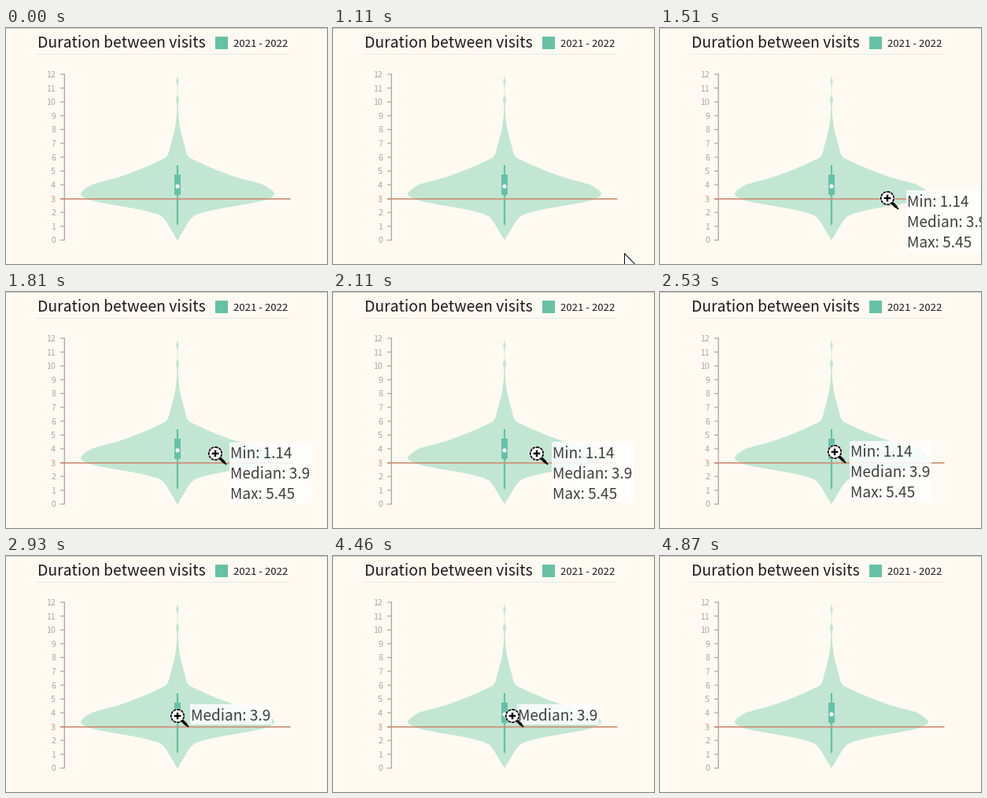
Recreate the animation shown at these times as a matplotlib script. Size 408x301 px, loop 5470 ms.

```python
import numpy as np
import matplotlib.pyplot as plt
from matplotlib.animation import FuncAnimation
from matplotlib.patches import Circle, Polygon, Rectangle

W, H, DPI = 408, 301, 64
LOOP, STEP = 5470, 10
PT = 72 / DPI  # points per pixel
CENTER = 218

CREAM, MINT, GREEN = "#fffaf1", "#c3e6d4", "#67c1a5"
GREY, RUST, INK, TIP_INK = "#a9a7a3", "#cd9178", "#1c1a1e", "#404040"
FONT = "Noto Sans CJK JP"

fig = plt.figure(figsize=(W / DPI, H / DPI), dpi=DPI, facecolor=CREAM)
ax = fig.add_axes([0, 0, 1, 1])
ax.set_xlim(0, W)
ax.set_ylim(H, 0)
ax.axis("off")


def line(xs, ys, color, width, z=1):
    return ax.plot(xs, ys, color=color, lw=width * PT, zorder=z,
                   solid_capstyle="butt", snap=False)[0]


def text(x, y, label, px, color, z=1, **kw):
    return ax.text(x, y, label, fontsize=px * PT, color=color, family=FONT,
                   va="baseline", zorder=z, **kw)


def box(x, y, w, h, color, z=1, **kw):
    return ax.add_patch(Rectangle((x, y), w, h, fc=color, lw=0, zorder=z, **kw))


def level(value):
    return 270.5 - value * 17.63


def smooth(points, x):
    """Monotone cubic curve through the points."""
    px, py = np.array(points, float).T
    step = np.diff(px)
    slope = np.diff(py) / step
    a, b = slope[:-1], slope[1:]
    same = a * b > 0
    inner = np.where(same, 2 * a * b / np.where(same, a + b, 1), 0)
    m = np.r_[slope[0], inner, slope[-1]]
    i = np.clip(np.searchsorted(px, x) - 1, 0, len(step) - 1)
    u = (x - px[i]) / step[i]
    v = 1 - u
    return (py[i] * (1 + 2 * u) * v**2 + py[i + 1] * (1 + 2 * v) * u**2
            + step[i] * u * v * (m[i] * v - m[i + 1] * u))


BODY = [(59, 0), (104, .8), (123, 2.5), (150, 9), (163, 13), (172, 29),
        (190, 74), (201, 111), (212, 123), (218, 115), (234, 38),
        (240, 20.5), (260, 6.5), (271, 0)]
rows = np.linspace(59, 271, 425)
# two outlying visits make small beads on the upper tail
beads = sum(1.5 * np.exp(-((rows - y) / 4.5) ** 2) for y in (68, 92))
half_width = smooth(BODY, rows) + beads


def inside_violin(x, y):
    return abs(x - CENTER) < np.interp(y, rows, half_width, left=0, right=0)


def draw_header():
    line([0, W], [0.5, 0.5], "#c9c7c3", 1)
    line([38, 362], [33.5, 33.5], "#ece8df", 1)
    text(40.5, 25, "Duration between visits", 19.4, INK)
    box(266, 11, 16, 16, GREEN)
    text(289, 24, "2021 - 2022", 13.2, INK)


def draw_axis():
    for value in range(13):
        y = level(value)
        line([69, 74], [y, y], GREY, 1.2)
        text(63, y + 4, str(value), 10.6, RUST if value == 3 else GREY, ha="right")
    line([74.3, 74.3], [level(12) - .6, level(0) + .6], GREY, 1.3)


def draw_violin():
    xs = np.r_[CENTER - half_width, CENTER + half_width[::-1]]
    outline = np.column_stack([xs, np.r_[rows, rows[::-1]]])
    ax.add_patch(Polygon(outline, fc=MINT, lw=0, zorder=2))
    line([CENTER, CENTER], [175, 251], GREEN, 2.3, 3)
    box(CENTER - 4, 187, 8, 26, GREEN, 3)
    line([69, 361.5], [218, 218], RUST, 1.7, 4)
    ax.add_patch(Circle((CENTER, 202), 2.6, fc="white", lw=0, zorder=5))


class Lens:
    def __init__(self):
        self.disc = ax.add_patch(Circle((0, 0), 9.3, fc="white", lw=0, zorder=9))
        self.ring = ax.add_patch(Circle((0, 0), 8.2, fill=False, ec="black",
                                        lw=1.7 * PT, ls=(0, (2.2, .5)), zorder=10))
        self.plus = [line([], [], "black", 2.4, 11) for _ in range(2)]
        self.handle = [line([], [], "black", w, 10) for w in (3.6, 2)]
        self.parts = [self.disc, self.ring, *self.plus, *self.handle]

    def place(self, x, y):
        self.disc.center = self.ring.center = x, y
        self.plus[0].set_data([x - 4.3, x + 4.3], [y, y])
        self.plus[1].set_data([x, x], [y - 4.3, y + 4.3])
        for part, (a, b) in zip(self.handle, ((6, 11.5), (11, 14))):
            part.set_data([x + a, x + b], [y + a, y + b])


class Tooltip:
    LINES = "Min: 1.14", "Median: 3.9", "Max: 5.45"

    def __init__(self):
        self.panel = box(0, 0, 104, 78, "white", 7, alpha=.85)
        self.rows = [text(0, 0, "", 19.1, TIP_INK, 8) for _ in self.LINES]
        self.parts = [self.panel, *self.rows]

    def place(self, x, y, lines):
        self.panel.set_xy((x - 1.5, y))
        self.panel.set_height(26 * len(lines))
        for i, row in enumerate(self.rows):
            row.set_text(lines[i] if i < len(lines) else "")
            row.set_position((x, y + 21 + 26 * i))


def ease_in(*power):
    return lambda u: u ** np.array(power)


def ease_out(*power):
    return lambda u: 1 - (1 - u) ** np.array(power)


def glide(begin, step, count, start, end, ease):
    """Pointer stops as (time, position), one for every step."""
    start, end = np.array(start), np.array(end)
    return [(begin + k * step, np.round(start + (end - start) * ease(k / count)))
            for k in range(count + 1)]


OFF_STAGE = np.array([W + 20, H + 20])
STOPS = [
    (0, OFF_STAGE),
    *glide(1110, 100, 7, (370, 287), (266, 206), ease_out(1.8, 2.4)),
    *glide(1910, 100, 3, (265, 206), (252, 206), ease_in(2)),
    *glide(2330, 100, 6, (237, 206), (CENTER, 204), ease_out(4)),
    *glide(4460, 103, 3, (228, 204), (380, 212), ease_in(1.8)),
    (4870, OFF_STAGE),
]
TIMES = [time for time, _ in STOPS]

draw_header()
draw_axis()
draw_violin()
lens, tip = Lens(), Tooltip()
ARROW = np.array([(0, 0), (0, 20), (4.6, 16), (8, 23), (11, 21.6), (7.8, 15), (14.5, 15)])
arrow = ax.add_patch(Polygon(ARROW, fc="white", ec="black", lw=PT, zorder=10))


def update(frame):
    i = np.searchsorted(TIMES, frame * STEP, side="right") - 1
    here, before = STOPS[i][1], STOPS[i - 1][1]
    hovering = inside_violin(*here)
    arrow.set_visible(not hovering)
    arrow.set_xy(ARROW + here + .5)
    for part in lens.parts + tip.parts:
        part.set_visible(hovering)
    lens.place(*here)
    # the tooltip reacts late: it trails the pointer by half a step
    if abs(before[0] - CENTER) < 4:
        tip.place(CENTER + 17, 189, Tooltip.LINES[1:2])
    else:
        x, y = (here + before) / 2
        tip.place(x + 17.5, y - 15, Tooltip.LINES)
    return [arrow, *lens.parts, *tip.parts]


anim = FuncAnimation(fig, update, frames=LOOP // STEP, interval=STEP,
                     repeat=True, repeat_delay=0, blit=False)
plt.show()
```
